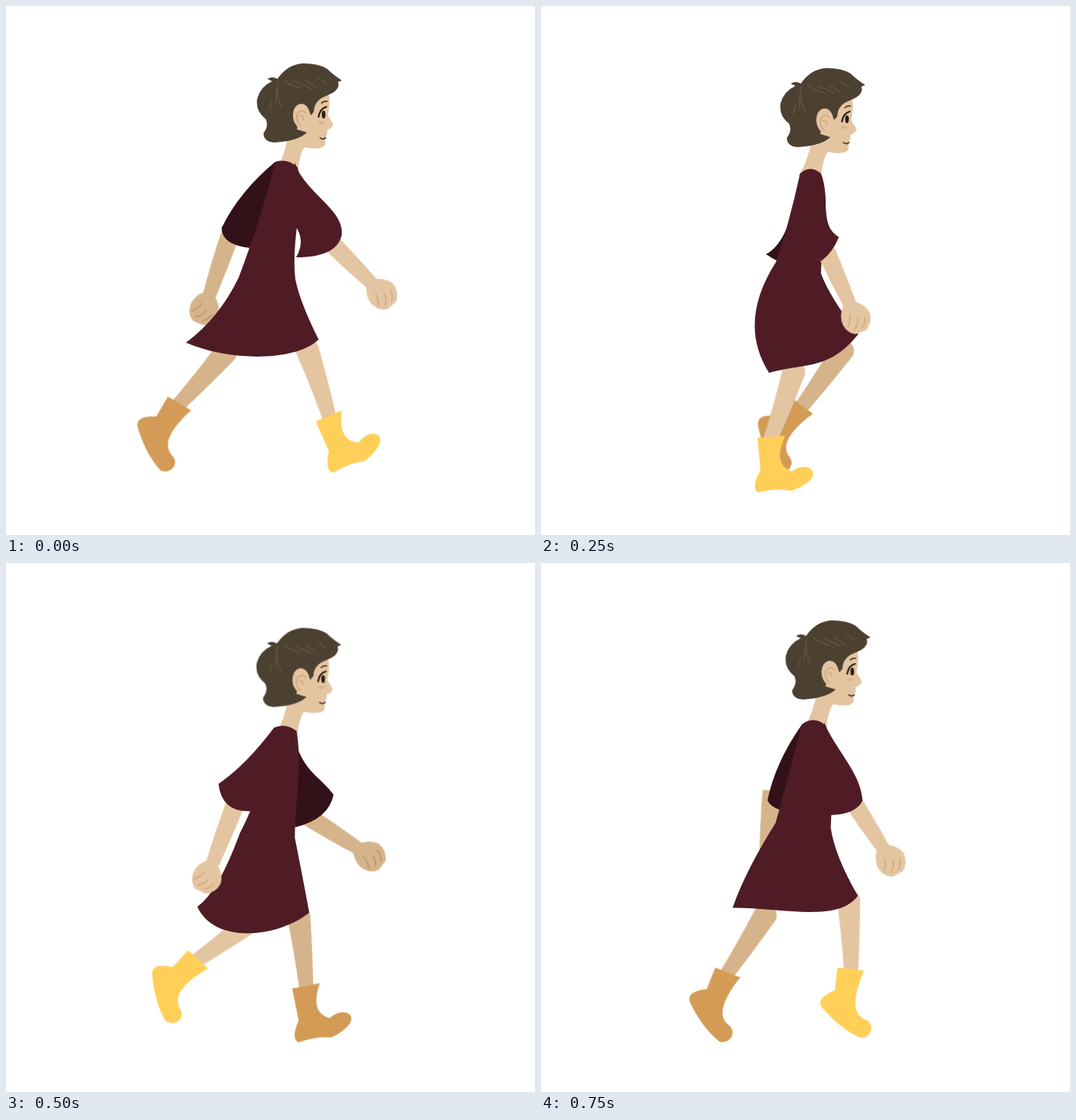
Animation, 682 px wide and 682 px high, one loop 0.8 s. Source, as an HTML page without scripts:

```html
<!DOCTYPE html>
<html lang="en">
<head>
<meta charset="utf-8">
<title>Walk cycle</title>
<style>
html, body { margin: 0; width: 100%; height: 100%; overflow: hidden; background: #fff; }
svg { display: block; width: 100%; height: 100%; }

.near { --skin: #e4c5a2; --line: #d2ab84; --boot: #ffcf57; --cloth: #4f1c26; --delay: 0s; }
/* The far side walks the same cycle half a stride later. */
.far { --skin: #d6b48b; --line: #c0946a; --boot: #d39b55; --cloth: #331118; --delay: -.4s; }
.skin { fill: var(--skin); }
.cloth { fill: var(--cloth); }
.line { fill: none; stroke: var(--line); stroke-width: 1.8; stroke-linecap: round; }

/* Poses hold for 50 ms: steps(n) spans a gap of n poses, two unless a key says otherwise. */
.head { animation: head .4s steps(2) infinite; }
.dress { animation: dress .4s steps(2) infinite; }
.sleeve { animation: sleeve .8s steps(2) var(--delay) infinite; }
.arm { animation: arm .8s steps(2) var(--delay) infinite; }
.leg { animation: leg .8s steps(2) var(--delay) infinite; }
.boot { fill: var(--boot); animation: ankle .8s steps(2) var(--delay) infinite, sole .8s steps(1) var(--delay) infinite; }

@keyframes head {
  0% { transform: translate(1px, 1px); animation-timing-function: steps(3) }
  37.5% { transform: translate(0, 15.5px) }
  62.5% { transform: translate(-14px, 7px); animation-timing-function: steps(1) }
  75% { transform: translate(-15.5px, 1px) }
  100% { transform: translate(1px, 1px) }
}
@keyframes dress {
  0% { d: path("M347 201Q363 196 376 208C386 250 367 300 373 352Q379 382 403 430C372 460 284 457 232 434Q275 402 300 350Q332 265 347 201Z"); animation-timing-function: steps(3) }
  37.5% { d: path("M345 218Q359 210 374 221C380 264 376 314 372 355Q381 400 385 461C346 491 264 513 254 448Q274 433 302 348Q338 290 345 218Z") }
  62.5% { d: path("M334 216Q347 204 361 216C374 250 362 300 361 345Q372 375 409 423C372 470 340 460 294 473Q253 408 303 330Q320 280 334 216Z"); animation-timing-function: steps(1) }
  75% { d: path("M326 215Q342 197 358 211C378 245 384 290 374 330Q378 372 414 428C394 468 340 432 262 455Q253 390 305 320Q304 290 326 215Z") }
  100% { d: path("M347 201Q363 196 376 208C386 250 367 300 373 352Q379 382 403 430C372 460 284 457 232 434Q275 402 300 350Q332 265 347 201Z") }
}
@keyframes sleeve {
  0%, 100% { d: path("M372 201C384 240 436 262 433 294Q428 324 374 324Q387 302 372 282Z"); animation-timing-function: steps(3) }
  18.75% { d: path("M370 220C372 278 390 281 417 301Q410 333 372 349Q368 320 366 290Z") }
  31.25% { d: path("M360 216C374 250 358 282 384 298Q376 318 361 329Q345 310 335 280Z"); animation-timing-function: steps(1) }
  37.5% { d: path("M340 205C350 250 332 290 330 330Q318 329 306 326Q303 275 326 215Z") }
  50% { d: path("M360 204C355 250 328 294 315 312Q278 308 278 286Q301 239 347 201Z"); animation-timing-function: steps(3) }
  68.75% { d: path("M360 217C355 260 330 300 315 324Q278 328 272 284Q312 273 345 218Z") }
  81.25% { d: path("M352 212C362 250 352 300 345 333Q318 340 290 320Q322 304 334 216Z"); animation-timing-function: steps(1) }
  87.5% { d: path("M358 210C374 240 390 280 396 319Q384 324 373 326Q366 290 360 260Z") }
}

/* Arms pivot at the fist, legs at the top of the boot. */
@keyframes arm {
  0%, 100% { transform: translate(485px, 371px) rotate(-45deg); animation-timing-function: steps(3) }
  18.75% { transform: translate(477px, 381px) rotate(-64deg) }
  31.25% { transform: translate(406px, 402px) rotate(-24deg); animation-timing-function: steps(1) }
  37.5% { transform: translate(331px, 407px) rotate(-9deg) }
  50% { transform: translate(266px, 391px) rotate(19deg); animation-timing-function: steps(3) }
  68.75% { transform: translate(256px, 413px) rotate(22deg) }
  81.25% { transform: translate(328px, 425px) rotate(2deg); animation-timing-function: steps(1) }
  87.5% { transform: translate(417px, 396px) rotate(-20deg) }
}
@keyframes leg {
  0%, 100% { transform: translate(416px, 528px) rotate(-18deg); animation-timing-function: steps(3) }
  18.75% { transform: translate(372px, 553px) rotate(0deg) }
  31.25% { transform: translate(297px, 555px) rotate(19deg); animation-timing-function: steps(1) }
  37.5% { transform: translate(258px, 543px) rotate(24deg) }
  50% { transform: translate(224px, 512px) rotate(42deg); animation-timing-function: steps(3) }
  68.75% { transform: translate(260px, 510px) rotate(60deg) }
  81.25% { transform: translate(337px, 515px) rotate(36deg); animation-timing-function: steps(1) }
  87.5% { transform: translate(383px, 518px) rotate(14deg) }
}
@keyframes ankle {
  0%, 18.75%, 100% { transform: rotate(0deg) }
  31.25% { transform: rotate(-19deg); animation-timing-function: steps(1) }
  37.5%, 68.75% { transform: rotate(0deg) }
  81.25% { transform: rotate(12deg); animation-timing-function: steps(1) }
  87.5% { transform: rotate(27deg); animation-timing-function: steps(1) }
  93.75% { transform: rotate(20deg); animation-timing-function: steps(1) }
}
/* Flat on the ground, then pointed while the foot swings. */
@keyframes sole {
  0%, 100% { d: path("M-18 2L18-1Q1 36 26 45C49 28 75 52 26 70Q7 66-17 72Q-27 66-14 44Z") }
  37.5% { d: path("M-17 4L17-3Q11 57 40 57C51 59 54 75 40 81Q14 79-17 61Q-34 52-11 33Z") }
}
</style>
</head>
<body>
<svg viewBox="0 0 682 682">
  <defs>
    <g id="arm">
      <path class="skin" d="M-8-12Q-12-60-12-106L12-106Q11-55 8-12Z"/>
      <path class="skin" d="M-8-21Q-20-10-19 2Q-18 14-9 19L5 20Q18 14 19 0Q18-10 8-19Z"/>
      <path class="line" d="M-14 7Q-8 1-6-6M-8 13Q0 9 2 2M2 15Q9 11 11 4"/>
    </g>
    <path id="shin" class="skin" d="M-9 6Q-10-40-15-90Q-12-102 0-102Q12-102 15-90Q13-40 9 6Z"/>
  </defs>

  <g class="far">
    <g transform="translate(-10)"><use class="arm" href="#arm"/></g>
    <path class="sleeve cloth"/>
    <g class="leg"><use href="#shin"/><path class="boot"/></g>
  </g>

  <g class="near">
    <g class="leg"><use href="#shin"/><path class="boot"/></g>

    <g class="head">
      <path class="skin" d="M380 112L415 113Q418 122 414 140L421 152Q419 157 413 159L413 164L410 170Q413 179 405 182Q394 184 384 181Q378 188 375 212L346 212Q358 194 363 165Z"/>
      <path fill="#4c4031" d="M349 93Q362 74 382 73Q402 73 413 80Q420 87 432 95L427 97Q431 107 414 114Q396 120 396 135L392 140L380 128L374 158L387 162Q376 173 345 175Q331 174 331 163Q338 154 334 145Q320 134 323 118Q327 103 342 96L336 93Q342 89 349 93Z"/>
      <path fill="none" stroke="#5e523f" stroke-width="1.7" stroke-linecap="round" d="M350 97Q346 112 354 129M348 104L347 124M342 121L339 132M358 95Q368 103 380 105M372 96L393 106M386 95L399 104M401 91L412 99"/>
      <path class="skin" d="M391 138Q388 125 379 125Q369 127 369 141Q370 157 388 161L398 150Z"/>
      <path class="line" d="M386 137Q380 130 374 139Q373 149 379 153M377 141Q383 139 382 146"/>
      <path fill="#d9ad88" d="M401 148Q406 146 411 149Q407 153 401 151Z" opacity=".7"/>
      <path fill="none" stroke="#2a1c17" stroke-width="2.2" stroke-linecap="round" d="M402 142Q404 131 412 129"/>
      <ellipse cx="408.5" cy="139" rx="2.4" ry="5" fill="#2a1c17"/>
      <path fill="none" stroke="#5a4331" stroke-width="1.8" stroke-linecap="round" d="M406 124Q409 121 413 122M404 169Q408 172 411 169"/>
    </g>

    <path class="dress cloth"/>
    <use class="arm" href="#arm"/>
    <path class="sleeve cloth"/>
  </g>
</svg>
</body>
</html>
```
